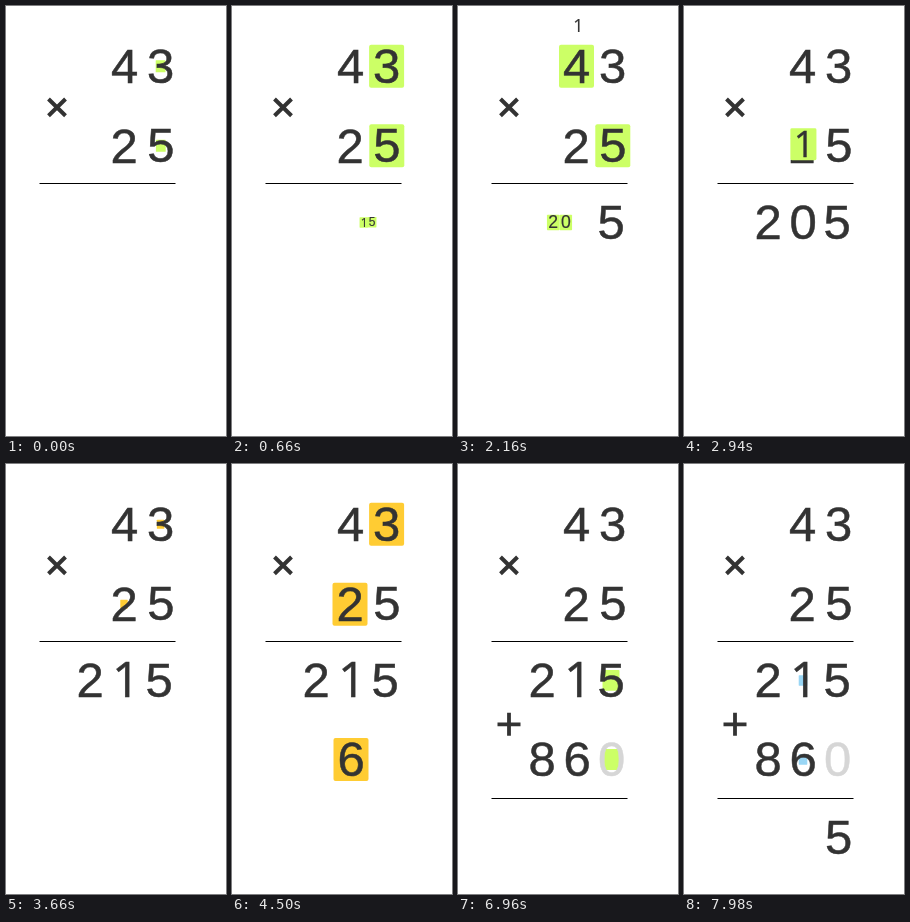
Write an HTML page that moves like this. It is 220 px wide and 430 px high and loops after 8 s.

```html
<!DOCTYPE html>
<html lang="en">
<head>
<meta charset="utf-8">
<title>Long multiplication</title>
<style>
  html, body { margin: 0; width: 100%; height: 100%; overflow: hidden; background: #fff; }
  svg { display: block; width: 100vw; height: 100vh; }
  text {
    font: 49px "Liberation Sans", Arial, sans-serif; text-anchor: middle;
    fill: #333; stroke: #333; stroke-width: .5;
  }
  .one { font-family: "Open Sans", sans-serif; }
  .faint { fill: #d6d6d6; stroke: #d6d6d6; }
</style>
</head>
<body>
<svg id="stage" viewBox="0 0 220 430">
  <rect width="220" height="430" fill="#fff"/>
  <path d="M42.5 93L59.5 109.7M59.5 93L42.5 109.7" stroke="#333" stroke-width="4"/>
  <path id="plus" d="M-11.5 0H11.5M0 -11.5V11.5" stroke="#333" stroke-width="3.8"/>
  <path d="M33.5 177.5H169.5" stroke="#000"/>
  <path id="rule" stroke="#000"/>
</svg>
<script>
const LOOP = 8000, NS = "http://www.w3.org/2000/svg";
const GREEN = "#cf6", ORANGE = "#fc3", GREY = "#ebebeb", BLUE = "#99d6f5";
const W = 35, H = 43, PEAK = 1.27;
const stage = document.getElementById("stage");
const plus = document.getElementById("plus");
const rule = document.getElementById("rule");

const part = (t, start, len) => Math.min(1, Math.max(0, (t - start) / len));
const smooth = p => (1 - Math.cos(Math.PI * p)) / 2;
const ease = (t, start, len) => smooth(part(t, start, len));
const mix = (a, b, p) => a + (b - a) * p;

// Scale from "from" past full size and back to 1
function pop(t, start, from = 0) {
  const up = Math.sin(part(t, start, 170) * Math.PI / 2);
  return mix(from, PEAK, up) - (PEAK - 1) * ease(t, start + 170, 200);
}

function add(parent, tag, attrs) {
  const el = document.createElementNS(NS, tag);
  for (const k in attrs) el.setAttribute(k, attrs[k]);
  return parent.appendChild(el);
}

// marks: [on, off, colour]; pop: entry time; mid: x the entry scales around
function cell(digit, x, y, marks = [], opts = {}) {
  const g = add(stage, "g", {});
  const box = add(g, "rect", { x: -W / 2, y: -H / 2, width: W, height: H, rx: 2 });
  const label = add(g, "text", { y: 16.5 });
  label.textContent = digit;
  return { x, y, marks, g, box, label, mid: x, ...opts };
}

const cells = [
  cell(4, 118.5, 60.3, [[1640, 2510, GREEN], [4650, 5680, GREY]]),
  cell(3, 154.6, 60.3, [[-70, 1420, GREEN], [3600, 4510, ORANGE]]),
  cell(2, 118, 140.2, [[3600, 4510, ORANGE], [4650, 5680, GREY]]),
  cell(5, 154.8, 139.8, [[-70, 1420, GREEN], [1640, 2510, GREEN]]),
  cell(5, 153, 216.3, [[0, 1420, GREEN], [6863, 7760, GREEN]], { pop: 640, mid: 136 }),
  cell(2, 84, 216.5, [[1900, 2510, GREEN]], { pop: 2130, mid: 101.5 }),
  cell(0, 119, 216.5, [[1900, 2510, GREEN]], { pop: 2130, mid: 101.5, end: 3150 }),
  cell(6, 119, 295.5, [[3800, 4510, ORANGE], [7915, 9000, BLUE]], { pop: 4120 }),
  cell(8, 84, 295.5, [[4750, 5680, GREY]], { pop: 5000 }),
  cell(5, 154.5, 373.5, [[7200, 7760, GREEN]], { pop: 7450 })
];
const zero = cell(0, 153.7, 295.5, [[6863, 7760, GREEN]]);
zero.label.setAttribute("class", "faint");
const carry = cell(1, 119, 216.5,
  [[0, 1420, GREEN], [2480, 3430, GREEN], [7915, 9000, BLUE]], { pop: 640, mid: 136 });
carry.label.setAttribute("class", "one");
carry.label.setAttribute("x", 1);

function place(c, x, y, scale) {
  c.g.setAttribute("transform", `translate(${x} ${y}) scale(${scale})`);
}

function mark(c, t) {
  let size = 0;
  for (const [on, off, colour] of c.marks) {
    const s = ease(t, on, 200) - ease(t, off, 160);
    if (s > size) {
      size = s;
      c.box.setAttribute("fill", colour);
    }
  }
  c.box.setAttribute("transform", `scale(${size})`);
}

function draw(t) {
  for (const c of cells) {
    const s = c.pop ? pop(t, c.pop) : 1;
    place(c, c.mid + (c.x - c.mid) * s, c.y, t < c.end || !c.end ? s : 0);
    mark(c, t);
  }

  // The carried 1 rises above the 4, then drops onto the 0
  const up = ease(t, 1000, 250) - ease(t, 2670, 480);
  const s = t < 3200 ? pop(t, carry.pop) : pop(t, 3200, 1);
  const x = t < 1000 ? carry.mid + (carry.x - carry.mid) * s : mix(carry.x, 120, up);
  place(carry, x, mix(carry.y, 20.5, up), s * mix(1, 0.36, up));
  mark(carry, t);

  plus.setAttribute("transform", `translate(51 260.3) scale(${ease(t, 5780, 200)})`);
  const len = ease(t, 6000, 350);
  rule.setAttribute("d", len ? `M33.5 334.5H${33.5 + 136 * len}` : "");

  const enter = ease(t, 6350, 330);
  place(zero, zero.x + 24 * (1 - enter), zero.y, 1);
  zero.g.setAttribute("opacity", enter);
  mark(zero, t);
}

const begin = performance.now();
function tick() {
  draw((performance.now() - begin) % LOOP);
  requestAnimationFrame(tick);
}
draw(0);
requestAnimationFrame(tick);
</script>
</body>
</html>
```
